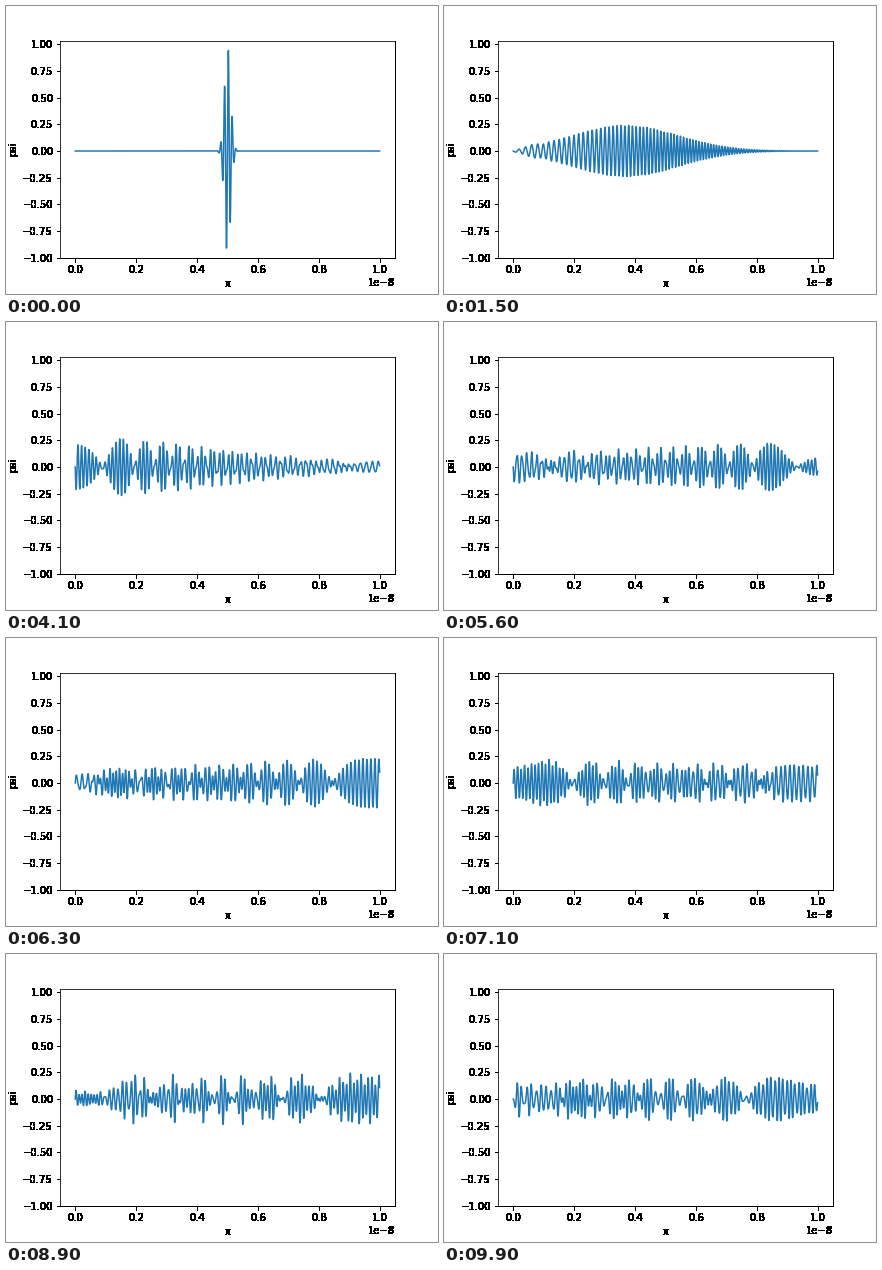
A matplotlib script that plays this animation: 432x288 px, repeating every 10 s.

```python
import numpy as np
import matplotlib.pyplot as plt
from matplotlib.animation import FuncAnimation

# Electron wave packet in a box, solved with a discrete sine transform.
HBAR = 1.0546e-34
MASS = 9.109e-31
L = 1e-8
N = 1000
SIGMA = 1e-10
KAPPA = 5e10
DT = 1e-16
FRAMES = 100

n = np.arange(N)
x = n * L / N
psi0 = np.exp(-(x - L / 2) ** 2 / (2 * SIGMA ** 2) + 1j * KAPPA * x)
psi0[0] = 0

modes = np.sin(np.pi * np.outer(n, n) / N)
coeffs = 2 / N * modes @ psi0
omega = np.pi ** 2 * HBAR * n ** 2 / (2 * MASS * L ** 2)


def wave(t):
    # The positive exponent sends the packet to the left first.
    return modes @ (coeffs * np.exp(1j * omega * t)).real


plt.rcParams.update({"font.family": "DejaVu Sans", "font.size": 10,
                     "text.kerning_factor": 6})
fig = plt.figure(figsize=(6, 4), dpi=72, facecolor=(1, 1, 1, 0))
ax = fig.add_axes([0.125, 0.125, 0.775, 0.755])
line, = ax.plot(x, wave(0), color="tab:blue", lw=1.5)
ax.set_xlabel("x")
ax.set_ylabel("psi")
ax.set_xlim(ax.get_xlim())
ax.set_ylim(ax.get_ylim())

# Render the axes once without alpha, which gives the labels hard, heavy edges.
line.set_visible(False)
fig.canvas.draw()
frame = np.array(fig.canvas.buffer_rgba())
frame[..., 3] = 255
fig.patch.set_facecolor("white")
fig.figimage(frame, origin="upper", zorder=-1)
ax.set_axis_off()
line.set_visible(True)


def update(i):
    line.set_ydata(wave(i * DT))
    return line,


anim = FuncAnimation(fig, update, frames=FRAMES, interval=100, repeat=True,
                     repeat_delay=0, blit=False)
plt.show()
```
